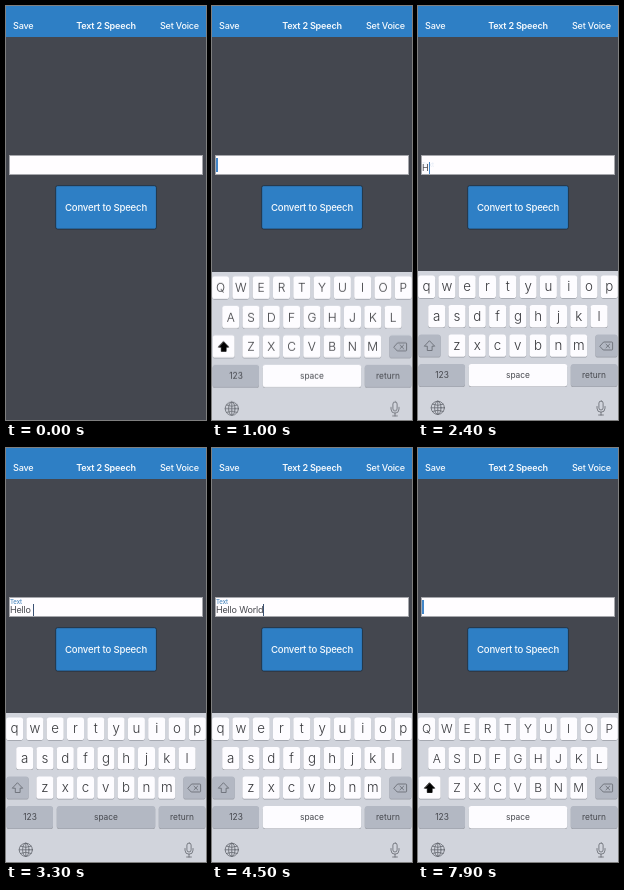
Recreate the animation shown at these times as an HTML page. Size 200 px wide and 414 px high, loop 8 s.

```html
<!DOCTYPE html>
<html lang="en">
<head>
<meta charset="utf-8">
<title>Text 2 Speech</title>
<style>
html, body { margin: 0; width: 100%; height: 100%; overflow: hidden; background: #44474f; }
svg { position: absolute; left: 0; top: 0; width: 200px; height: 414px; }
text, .field { font-family: Inter, Roboto, sans-serif; letter-spacing: -.2px; }
.bar { font-size: 9.07px; font-weight: 450; fill: #f6fafd; }
.bold { font-weight: 600; }
.field { position: absolute; left: 3px; top: 149px; width: 194px; height: 20px; background: #fffdff; color: #48494f; box-shadow: inset 0 0 0 1px #a6a7ac; }
.line { position: absolute; left: 1px; top: 7.4px; height: 12px; font-size: 9.07px; line-height: 12px; white-space: pre; }
.caret { position: absolute; left: 100%; top: 0; width: 1px; height: 12px; animation: blink 8s linear infinite, tint 8s linear infinite; }
.empty .caret { top: -4px; height: 14px; width: 1.5px; }
.label { position: absolute; left: 1px; top: 1px; font-size: 6px; line-height: 7px; font-weight: 500; letter-spacing: -.1px; color: #4a87bd; animation: float 8s linear infinite; }
.board { animation: rise 8s infinite; }
.save { animation: save 8s linear infinite; }
.convert { font-size: 9.6px; font-weight: 450; fill: #f6fafd; animation: convert 8s linear infinite; }
.key { fill: #fdfcff; }
.dark { fill: #b3b8c3; }
.shade { fill: #989ba3; }
.letter { font-size: 13.3px; font-weight: 300; fill: #36373b; letter-spacing: 0; }
.caps .letter { font-size: 12px; font-weight: 350; }
.word { font-size: 8.4px; fill: #45474d; letter-spacing: 0; }
.icon { fill: none; stroke: #62666e; stroke-width: .8; stroke-linejoin: round; stroke-linecap: round; }
.caps .shift { fill: #fdfcff; }
.caps .arrow { fill: #000; stroke: #000; }
.held .space { fill: #b3b8c3; }

@keyframes rise {
  0%, 6.875% { transform: translateY(149px); animation-timing-function: cubic-bezier(.25, .8, .3, 1); }
  13.75%, 100% { transform: none; }
}
@keyframes blink {
  0%, 8.7% { opacity: 0; }
  8.8%, 17.5% { opacity: 1; }
  18.75%, 21.5% { opacity: 0; }
  22.5%, 58.75% { opacity: 1; }
  60%, 65.6% { opacity: 0; }
  66.25%, 72.5% { opacity: 1; }
  73.75%, 77.5% { opacity: 0; }
  78.1%, 88.1% { opacity: 1; }
  89.4%, 93% { opacity: 0; }
  94%, 100% { opacity: 1; }
}
@keyframes tint {
  0%, 30.2% { background: #4386c8; }
  33%, 82.5% { background: #3b5273; }
  82.6%, 100% { background: #4386c8; }
}
@keyframes float {
  0%, 29.5% { opacity: 0; transform: translateY(6px); }
  33.2%, 82.5% { opacity: 1; transform: none; }
  85%, 100% { opacity: 0; transform: translateY(6px); }
}
@keyframes save {
  0%, 77.9% { opacity: 1; }
  78.1%, 80.6% { opacity: .2; }
  85%, 100% { opacity: 1; }
}
@keyframes convert {
  0%, 63.5% { opacity: 1; }
  63.7%, 64.8% { opacity: .25; }
  67.5%, 100% { opacity: 1; }
}
</style>
</head>
<body>
<svg viewBox="0 0 200 414">
  <rect width="200" height="414" fill="#44474f"/>
  <rect width="200" height="31" fill="#2e7fc5"/>
  <text class="bar save" x="7" y="22.5">Save</text>
  <text class="bar bold" x="100" y="22.5" text-anchor="middle">Text 2 Speech</text>
  <text class="bar" x="193" y="22.5" text-anchor="end">Set Voice</text>
  <rect x="49.7" y="179.7" width="100.7" height="43.4" rx="2" fill="#2e7fc5" stroke="#1c2b3a" stroke-width=".8"/>
  <text class="convert" x="100" y="205" text-anchor="middle">Convert to Speech</text>
</svg>
<div class="field empty" id="field">
  <div class="label">Text</div>
  <div class="line"><span id="typed"></span><i class="caret"></i></div>
</div>
<svg viewBox="0 0 200 414">
  <g class="board caps" id="board">
    <rect y="265" width="200" height="150" fill="#d1d4dc"/>
    <g id="keys"></g>
    <path class="icon arrow" d="M11.7 335 l5 5.2 h-2.6 v4.3 h-4.8 v-4.3 h-2.6 z"/>
    <path class="icon" d="M182 340 l3.6 -4 h8.2 q.8 0 .8 .8 v6.4 q0 .8 -.8 .8 h-8.2 z M188 338.2 l3.6 3.6 m0 -3.6 l-3.6 3.6"/>
    <g class="icon">
      <circle cx="19.8" cy="401.8" r="6.6"/>
      <ellipse cx="19.8" cy="401.8" rx="3.2" ry="6.6"/>
      <path d="M13.2 401.8 h13.2 M19.8 395.2 v13.2 M14.4 398.2 q5.4 2.4 10.8 0 M14.4 405.4 q5.4 -2.4 10.8 0"/>
      <rect x="180.9" y="395" width="4.2" height="9" rx="2.1"/>
      <path d="M179 400.5 v1.7 q0 4 4 4 t4 -4 v-1.7 M183 406.2 v2.8 M180.6 409 h4.8"/>
    </g>
  </g>
</svg>
<script>
const LOOP = 8000;
const TEXT = "Hello World";
const STROKES = [2330, 2550, 2750, 2900, 3050, 3250, 3680, 3820, 3950, 4120, 4280];
const CLEAR = 6600;
const field = document.getElementById("field");
const typed = document.getElementById("typed");
const board = document.getElementById("board");
const keys = document.getElementById("keys");

function add(tag, attrs, label = "") {
  const node = document.createElementNS("http://www.w3.org/2000/svg", tag);
  for (const name in attrs) node.setAttribute(name, attrs[name]);
  node.textContent = label;
  keys.append(node);
  return node;
}

function addKey(x, y, width, kind = "") {
  const box = { x, width, height: 22.4, rx: 2.6 };
  add("rect", { ...box, y: y + .7, class: "shade" });
  add("rect", { ...box, y, class: "key " + kind });
}

function addLabel(x, y, kind, label) {
  return add("text", { x, y, class: kind, "text-anchor": "middle" }, label);
}

const letters = [];
["qwertyuiop", "asdfghjkl", "zxcvbnm"].forEach((row, r) => {
  const top = 269.6 + r * 29.4;
  const first = [8.6, 18.7, 38.9][r];
  [...row].forEach((char, i) => {
    const x = first + i * 20.3;
    addKey(x - 8.5, top, 17);
    letters.push({ char, node: addLabel(x, top + 15.6, "letter", char) });
  });
});
addKey(.6, 328.4, 22, "dark shift");
addKey(177.4, 328.4, 22, "dark");
addKey(.6, 358, 46.4, "dark");
addKey(50.8, 358, 98.4, "space");
addKey(152.8, 358, 46.6, "dark");
addLabel(24, 372, "word", "123");
addLabel(100, 372, "word", "space");
addLabel(176, 372, "word", "return");

let wasCaps;
function setCaps(caps) {
  if (caps === wasCaps) return;
  wasCaps = caps;
  board.classList.toggle("caps", caps);
  for (const { char, node } of letters) node.textContent = caps ? char.toUpperCase() : char;
}

let start;
function draw(now) {
  start ??= now;
  const t = (now - start) % LOOP;
  const count = t < CLEAR ? STROKES.filter(s => s <= t).length : 0;
  typed.textContent = TEXT.slice(0, count);
  field.classList.toggle("empty", !count);
  board.classList.toggle("held", t >= 3220 && t < 3370);
  setCaps(!count || (t >= 3500 && t < 3700));
  requestAnimationFrame(draw);
}
requestAnimationFrame(draw);
</script>
</body>
</html>
```
